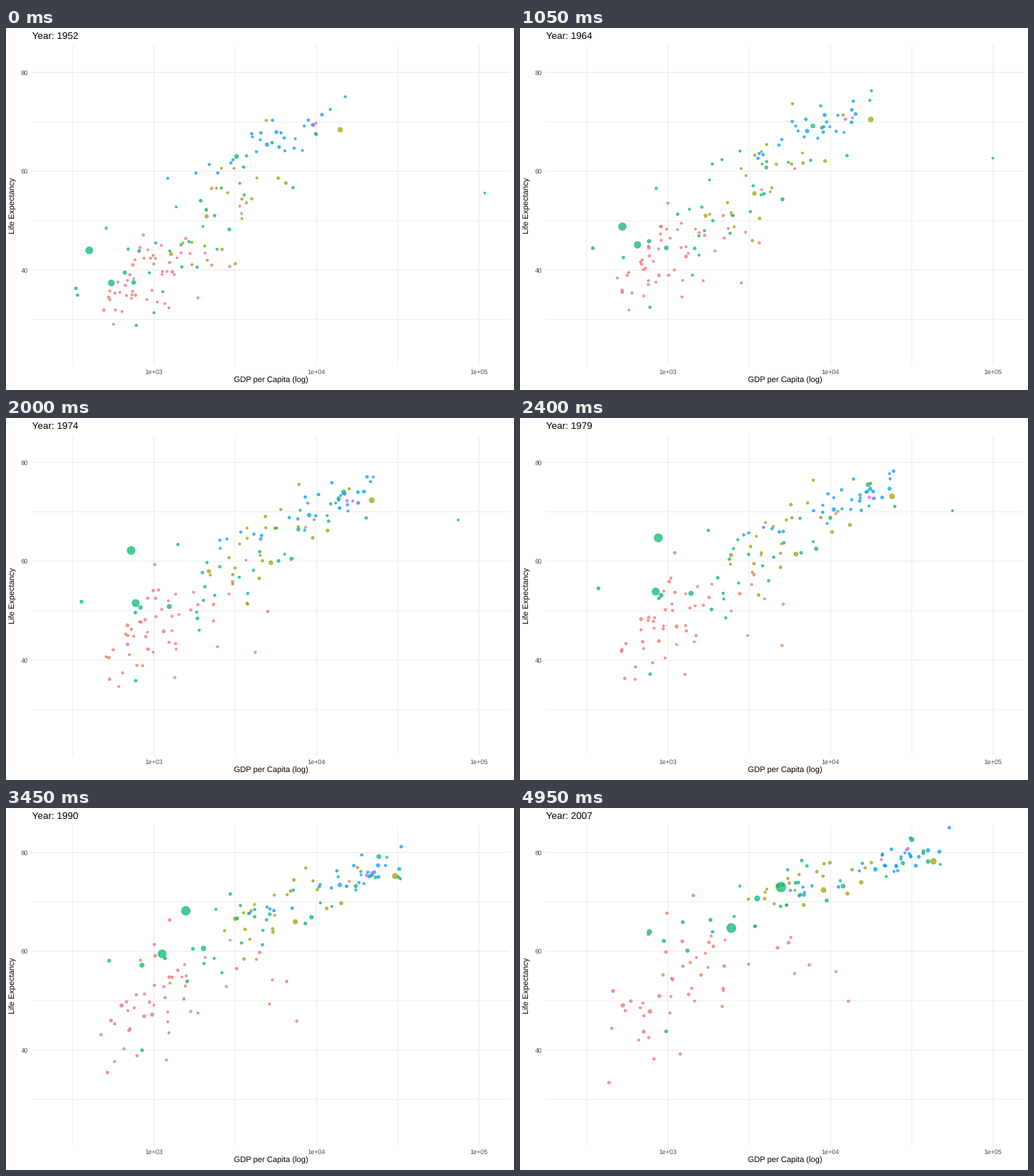
Write a matplotlib script that moves like this. It is 700 px wide and 500 px high and loops after 5 s.

```python
import matplotlib.pyplot as plt
import numpy as np
from matplotlib.animation import FuncAnimation
from matplotlib.colors import to_rgba

W, H, DPI = 700, 500, 100
PT = 72 / DPI                      # points per pixel
FRAMES, STEP_MS = 100, 50
FIRST, LAST = 1952, 2007
KNOTS = 12                         # one every five years
SPAN = (FRAMES - 1) // (KNOTS - 1)
LEFT, RIGHT, TOP, BOTTOM = 35.5, 694.5, 23.7, 466.3
MAX_POP = 1319                     # millions

rng = np.random.default_rng(5)
plt.rcParams["font.family"] = "Liberation Sans"
plt.rcParams["text.hinting"] = "none"


def spread(values):
    """Resample evenly spaced key points to the five-year grid."""
    return np.interp(np.linspace(0, 1, KNOTS),
                     np.linspace(0, 1, len(values)), values)


def track(pop, gdp, life):
    """One large or outlying dot, led through a few key points."""
    return spread(np.log10(gdp)), spread(life), spread(np.log(pop))


def scores(n):
    """Shuffled, evenly filled bell curve of n standard scores."""
    p = (np.arange(n) + .5) / n
    return np.clip(rng.permutation(np.log(p / (1 - p)) / 1.7), -2.1, 2.1)


def drifting(n):
    """Standard scores that turn slowly into others, one row per dot."""
    turn = np.linspace(0, .8, KNOTS)
    return np.outer(scores(n), np.cos(turn)) + np.outer(scores(n), np.sin(turn))


def crowd(n, gdp, gdp_dev, skew, life, life_dev, corr, pop):
    """Dots scattered about a moving centre; gdp is a base-10 logarithm."""
    zx = drifting(n)
    zy = corr * zx + np.sqrt(1 - corr ** 2) * drifting(n)
    x = spread(gdp) + spread(gdp_dev) * (zx + skew * zx ** 2)
    y = spread(life) + spread(life_dev) * zy
    x += rng.normal(0, .02, x.shape)
    y += rng.normal(0, .3, y.shape)
    size = spread(np.log(pop)) + scores(n)[:, None]
    return list(zip(x, y, size))


africa = crowd(52, (2.95, 3.05, 3.1), (.2, .36), .2,
               (39, 49, 54), (4.8, 8.5), .55, (2.5, 9))
americas = crowd(23, (3.45, 3.72, 3.83), (.2, .25), .1,
                 (53, 66, 73.5), (8, 3.2), .7, (4, 12))
asia = crowd(26, (3.2, 3.62, 3.78), (.3, .48), 0,
             (47, 61.5, 72), (8, 5), .75, (6, 20))
europe = crowd(30, (3.74, 4.08, 4.34), (.25, .22), -.08,
               (66, 72, 77.6), (4, 2.8), .88, (7, 10))
oceania = crowd(2, (4.01, 4.25, 4.47), (.02, .07), 0,
                (69.2, 72.7, 80.7), (.2, .6), .9, (5, 12))

americas += [
    track((158, 301), (13990, 24300, 42952), (68.4, 73.3, 78.2)),
    track((57, 190), (2109, 6500, 9066), (50.9, 61.8, 72.4)),
]
asia += [
    track((556, 1319), (400, 512, 702, 1170, 2145, 4959),
          (44, 47, 63.5, 66.4, 70.1, 73)),
    track((372, 1110), (547, 716, 1020, 2452), (37.4, 49.5, 59.1, 64.7)),
    track((86, 127), (3217, 12900, 23770, 31656), (63, 72.7, 78.9, 82.6)),
    track((82, 224), (750, 1400, 3541), (37.5, 54, 70.7)),
    track((.2, 2.5), (108382, 95000, 30000, 47307), (55.6, 66.7, 74.5, 77.6)),
    track((8.4, 32), (779, 770, 975), (28.8, 37.5, 43.8)),
    track((20, 48), (331, 365, 944), (36.3, 55.5, 62.1)),
]

REGIONS = [("#F66F68", africa), ("#A09E00", americas), ("#00B86E", asia),
           ("#009DF8", europe), ("#E05CF3", oceania)]
paths = np.array([dot for _, dots in REGIONS for dot in dots])
colors = [to_rgba(c, .72) for c, dots in REGIONS for _ in dots]


def to_x(log_gdp):
    return 203.9 + 224 * (log_gdp - 3)


def to_y(life):
    return 61.4 + 6.825 * (80 - life)


fig = plt.figure(figsize=(W / DPI, H / DPI), dpi=DPI, facecolor="white")
ax = fig.add_axes([0, 0, 1, 1])
ax.set(xlim=(0, W), ylim=(H, 0))
ax.axis("off")


def grid_line(xs, ys, width):
    ax.plot(xs, ys, color="#EBEBEB", lw=width * PT, snap=False,
            solid_capstyle="butt", zorder=1)


def label(x, y, text, size, color="black", **kw):
    return ax.text(x, y, text, fontsize=size * PT, color=color, **kw)


for k in range(6):
    major = k % 2 == 1
    width = 1.07 if major else .8
    life = 30 + 10 * k
    x, y = to_x(2.5 + k / 2), to_y(life)
    grid_line([x, x], [TOP, BOTTOM], width)
    grid_line([LEFT, RIGHT], [y, y], width)
    if major:
        label(x, 478.4, f"1e+0{3 + k // 2}", 8.8, "#4D4D4D", ha="center")
        label(30.6, y + 3.4, str(life), 8.8, "#4D4D4D", ha="right")

label((LEFT + RIGHT) / 2, 490, "GDP per Capita (log)", 11, ha="center")
label(13.2, (TOP + BOTTOM) / 2, "Life Expectancy", 11, rotation=90,
      rotation_mode="anchor", ha="center", va="baseline")
title = label(LEFT, 15, "", 13.2)

points = ax.scatter(*np.zeros((2, len(paths))), facecolors=colors,
                    edgecolors=colors, linewidths=.71 * PT, zorder=2)


def update(i):
    k = min(i // SPAN, KNOTS - 2)
    f = i / SPAN - k
    x, y, pop = ((1 - f) * paths[:, :, k] + f * paths[:, :, k + 1]).T
    size = 1 + 5 * np.sqrt(np.exp(pop) / MAX_POP)
    points.set_offsets(np.column_stack([to_x(x), to_y(y)]))
    points.set_sizes(((2.134 * size + .71) * PT) ** 2)
    year = FIRST + (LAST - FIRST) * i / (FRAMES - 1)
    title.set_text(f"Year: {round(year)}")
    return points, title


anim = FuncAnimation(fig, update, frames=FRAMES, interval=STEP_MS,
                     repeat=True, repeat_delay=0, blit=False)
plt.show()
```
